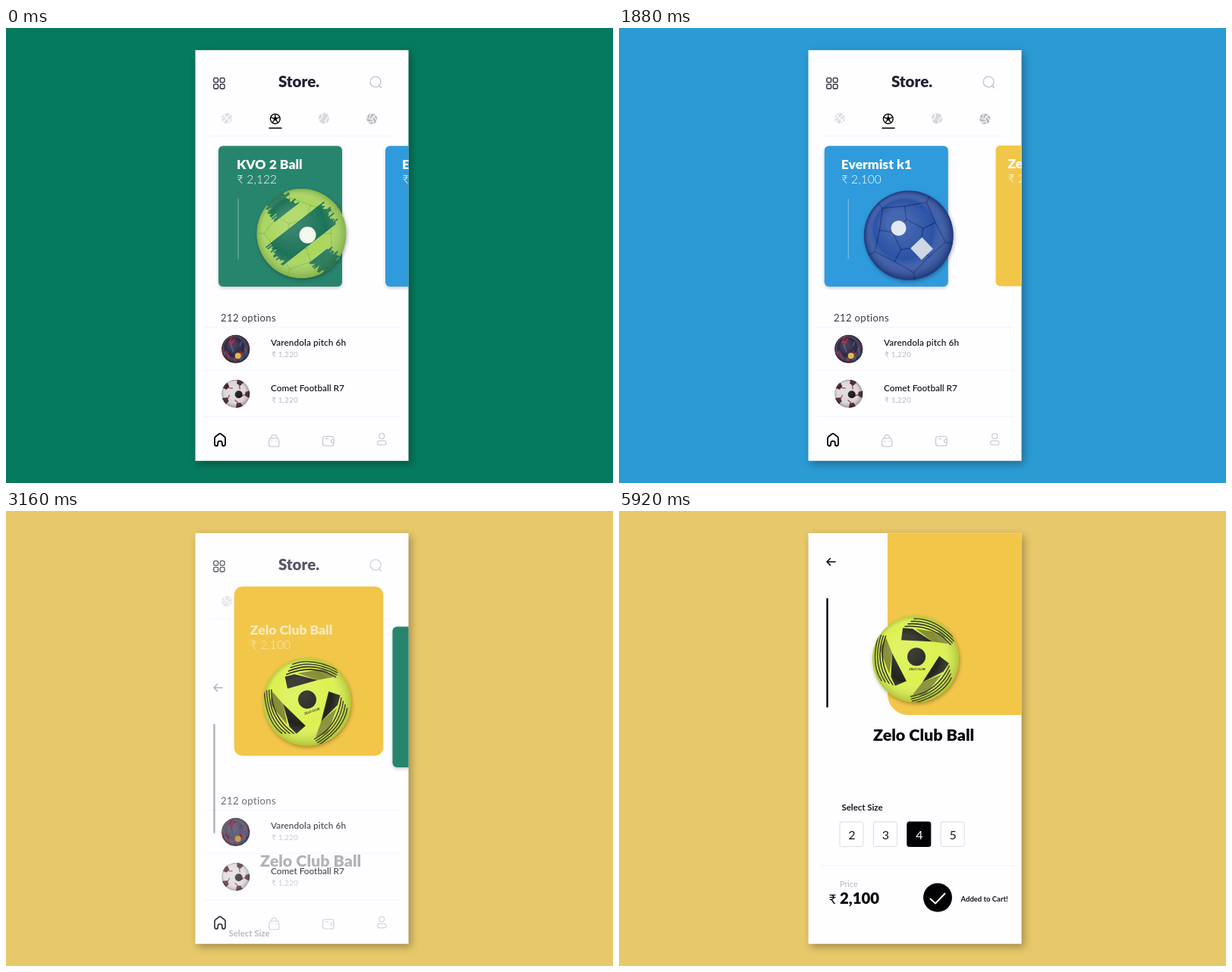
Write an HTML page with a canvas that moves like this. It is 800 px wide and 600 px high and loops after 6320 ms.

```html
<!DOCTYPE html>
<html lang="en">
<head>
<meta charset="utf-8">
<title>Ball store</title>
<style>
html, body { margin: 0; width: 100%; height: 100%; overflow: hidden; }
canvas { display: block; }
</style>
</head>
<body>
<canvas id="stage" width="800" height="600"></canvas>
<script>
const c = document.getElementById('stage').getContext('2d');
const LOOP = 6320, TAU = Math.PI * 2, RAD = Math.PI / 180;
const FONT = 'Lato, "Noto Sans", sans-serif';
const INK = '#231f32', BLACK = '#020204', RULE = '#f4f4f6';
const GREEN = [6, 122, 94], BLUE = [38, 154, 214], YELLOW = [231, 200, 106];

const lerp = (a, b, p) => a + (b - a) * p;
const mix = (a, b, p) => a.map((v, i) => lerp(v, b[i], p));

// cubic-bezier(.42, 0, .58, 1)
function ease(x) {
  if (x <= 0) return 0;
  if (x >= 1) return 1;
  let lo = 0, hi = 1, s = x;
  for (let i = 0; i < 22; i++) {
    s = (lo + hi) / 2;
    const r = 1 - s;
    if (1.26 * r * r * s + 1.74 * r * s * s + s * s * s < x) lo = s; else hi = s;
  }
  return s * s * (3 - 2 * s);
}
const span = (t, from, to) => ease((t - from) / (to - from));

function seeded(n) {
  return () => (n = (n * 16807) % 2147483647) / 2147483647;
}

function text(s, x, y, size, weight, color, gap = 0, align = 'left') {
  c.font = `${weight} ${size}px ${FONT}`;
  c.letterSpacing = gap + 'px';
  c.textAlign = align;
  c.fillStyle = color;
  c.fillText(s, x, y);
}

function line(x1, y1, x2, y2, color, w = 1) {
  c.strokeStyle = color;
  c.lineWidth = w;
  c.beginPath();
  c.moveTo(x1, y1);
  c.lineTo(x2, y2);
  c.stroke();
}

function box(x, y, w, h, r) {
  c.beginPath();
  c.roundRect(x, y, w, h, r);
}

function disc(x, y, r, color) {
  c.fillStyle = color;
  c.beginPath();
  c.arc(x, y, r, 0, TAU);
  c.fill();
}

function poly(points, color) {
  c.fillStyle = color;
  c.beginPath();
  points.forEach(p => c.lineTo(p[0], p[1]));
  c.closePath();
  c.fill();
}

function icon(d, color, w) {
  c.strokeStyle = color;
  c.lineWidth = w;
  c.stroke(new Path2D(d));
}

function withAlpha(a, draw) {
  if (a <= 0) return;
  c.save();
  c.globalAlpha = Math.min(1, a);
  draw();
  c.restore();
}

function shadow(color, blur, x, y) {
  c.shadowColor = color;
  c.shadowBlur = blur;
  c.shadowOffsetX = x;
  c.shadowOffsetY = y;
}

// ---- balls ----

function ball(x, y, r, angle, base, rim, art) {
  c.save();
  c.translate(x, y);
  c.save();
  if (r > 30) shadow('rgba(0,0,0,.32)', 5, 1, 2);
  disc(0, 0, r, base);
  c.restore();
  c.beginPath();
  c.arc(0, 0, r, 0, TAU);
  c.clip();
  c.save();
  c.rotate(angle * RAD);
  art();
  c.restore();
  const g = c.createRadialGradient(-r * .25, -r * .3, r * .25, 0, 0, r);
  g.addColorStop(0, 'rgba(255,255,255,.12)');
  g.addColorStop(.55, 'rgba(255,255,255,0)');
  g.addColorStop(1, rim);
  disc(0, 0, r, g);
  c.restore();
}

// A central pentagon, spokes and outer ring of panels
function seams(color, r, w) {
  const at = (k, d) => [Math.cos(k * TAU / 10) * d, Math.sin(k * TAU / 10) * d];
  for (let k = 0; k < 10; k += 2) {
    const a = at(k, r * .36), b = at(k, r * .66);
    const left = at(k - 1, r * .84), right = at(k + 1, r * .84);
    line(...a, ...at(k + 2, r * .36), color, w);
    line(...a, ...b, color, w);
    line(...b, ...left, color, w);
    line(...b, ...right, color, w);
    line(...right, ...at(k + 1, r), color, w);
  }
}

function brush(x, y, w, h, angle, seed) {
  const rnd = seeded(seed);
  c.save();
  c.translate(x, y);
  c.rotate(angle * RAD);
  c.fillStyle = '#197158';
  for (let i = -h / 2; i < h / 2; i += 1.5) {
    const a = rnd() * 10, b = rnd() * 10;
    c.fillRect(-w / 2 + a, i, w - a - b, 1.9);
  }
  c.restore();
}

function greenBall(x, y, angle) {
  ball(x, y, 59, angle, '#a9d65d', 'rgba(60,110,40,.35)', () => {
    seams('rgba(90,150,50,.4)', 59, 1);
    brush(2, 0, 100, 33, -38, 17);
    brush(-28, -38, 42, 27, 142, 31);
    brush(34, 37, 40, 27, -38, 53);
    disc(8, 2, 11, '#f2f8ee');
  });
}

function blueBall(x, y, angle) {
  ball(x, y, 59, angle, '#2c52a6', 'rgba(10,25,80,.5)', () => {
    seams('rgba(17,38,100,.75)', 59, 1.3);
    disc(-16, 3, 10, '#dfe6f2');
    c.fillStyle = '#ced7e4';
    c.fillRect(14, -11, 21, 21);
  });
}

function limeBall(x, y, r, angle) {
  ball(x, y, r, angle, '#dcf14f', 'rgba(110,130,10,.38)', () => {
    for (let k = 0; k < 3; k++) {
      c.save();
      c.rotate(k * TAU / 3);
      poly([[0, -40], [36, -34], [43, -20], [22, -23]], '#848c34');
      poly([[-17, -41], [-4, -40], [22, -23], [-19, -25]], '#22241c');
      for (let i = 0; i < 4; i++) {
        c.strokeStyle = '#2a2d18';
        c.lineWidth = 1.6;
        c.beginPath();
        c.moveTo(-14 + i * 4, -43 - i * 3.4);
        c.quadraticCurveTo(24, -46 - i * 3, 46 + i * 2, -19 - i * 2.5);
        c.stroke();
      }
      c.restore();
    }
    disc(1, -3, 12, '#20221a');
    text('ZELO CLUB', 2, 15, 4, 900, '#3d4120', 0, 'center');
  });
}

// ---- cards ----

const NAMES = { green: 'KVO 2 Ball', blue: 'Evermist k1', yellow: 'Zelo Club Ball' };
const FILLS = { green: '#28856d', blue: '#2f9bdc', yellow: '#f2c649' };
const PAD = { green: 24, blue: 22, yellow: 16 };

function label(kind, x, y) {
  text(NAMES[kind], x, y, 17.5, 900, '#fff');
  text(kind === 'green' ? '₹ 2,122' : '₹ 2,100', x, y + 19, 15.5, 300, '#fff', .1);
}

function panel(kind, x, y, w, h, r) {
  c.save();
  if (kind !== 'yellow') shadow('rgba(0,0,0,.2)', 4, 0, 2);
  c.fillStyle = FILLS[kind];
  box(x, y, w, h, r);
  c.fill();
  c.restore();
}

function card(kind, x, y, angle) {
  if (x > 531 || x < 60) return;
  panel(kind, x, y, 163, 185.5, 6);
  label(kind, x + PAD[kind], y + 30);
  if (kind !== 'yellow') {
    const lx = x + (kind === 'green' ? 26 : 31.5);
    line(lx, y + 70, lx, y + 149, 'rgba(255,255,255,.4)');
  }
  if (kind === 'green') greenBall(x + 109.5, y + 115.5, angle);
  if (kind === 'blue') blueBall(x + 111, y + 118, angle);
  if (kind === 'yellow') limeBall(x + 116, y + 115.5, 58, angle);
}

// ---- store screen ----

function tabIcon(x, y, color, kind) {
  c.save();
  c.translate(x, y);
  if (kind === 1) {
    c.strokeStyle = color;
    c.lineWidth = 1.4;
    c.beginPath();
    c.arc(0, 0, 6.4, 0, TAU);
    c.stroke();
    const star = [];
    for (let k = 0; k < 5; k++) {
      const a = (k * 72 - 90) * RAD, u = Math.cos(a), v = Math.sin(a);
      star.push([u * 2.7, v * 2.7]);
      line(u * 2, v * 2, u * 6, v * 6, color, 1.3);
    }
    poly(star, color);
  } else {
    disc(0, 0, 7, color);
    c.beginPath();
    c.arc(0, 0, 7.2, 0, TAU);
    c.clip();
    if (kind === 0) {
      icon('M-6-6L6 6M-6 6L6-6M-1-8Q-3 0-8 1M8-1Q1 2 1 8', '#fff', 1.2);
    } else if (kind === 2) {
      icon('M-3-8Q0 0-8 3M8-3Q0 0 3 8', '#fff', 1.3);
    } else {
      for (let k = 0; k < 3; k++) {
        c.rotate(TAU / 3);
        icon('M0 0Q1-5 7-5M-3-1Q-3-6 2-9', '#fff', 1.2);
      }
    }
  }
  c.restore();
}

function mottledBall(x, y) {
  ball(x, y, 18.5, 0, '#2c2540', 'rgba(20,10,20,.6)', () => {
    const rnd = seeded(77);
    for (let i = 0; i < 26; i++) {
      const px = rnd() * 36 - 18, py = rnd() * 36 - 18;
      line(px, py, px + rnd() * 10 - 5, py + 4 + rnd() * 6, i % 3 ? '#96203a' : '#2f4f8c', 2);
    }
    disc(3, 9, 4, '#e3b83c');
  });
}

function whiteBall(x, y) {
  ball(x, y, 18.5, 0, '#dcd7d9', 'rgba(60,30,40,.4)', () => {
    for (let k = 0; k < 5; k++) {
      c.save();
      c.rotate((k * 72 + 20) * RAD);
      poly([[-5, -20], [6, -20], [2, -12], [-3, -13]], '#3a1d28');
      line(0, -13, 3, -8, '#a04555', 1.3);
      c.restore();
    }
    disc(4, 1, 5, '#18161a');
  });
}

function storeScreen() {
  for (const x of [273.8, 282.2]) for (const y of [65.8, 74.2]) {
    c.strokeStyle = INK;
    c.lineWidth = 1.3;
    box(x, y, 5.8, 5.8, 1.6);
    c.stroke();
  }
  text('Store.', 386, 77.5, 20.5, 900, INK, 0, 'center');
  icon('M494 71a7 7 0 1 1-14 0a7 7 0 1 1 14 0M492 76.5L494.5 79', '#b9b9bf', 1.1);

  tabIcon(291, 119, '#dedee0', 0);
  tabIcon(354.8, 119.8, '#000', 1);
  tabIcon(419, 119.3, '#d9d9db', 2);
  tabIcon(482.3, 119.8, '#b9b9bb', 3);
  line(347, 132, 363, 132, '#000', 1.6);
  line(267, 142.5, 507, 142.5, RULE);

  text('212 options', 283, 386.5, 13, 400, '#3c3c42', .4);
  for (const y of [394.5, 451.5, 512.5]) line(261, y, 519, y, RULE);
  mottledBall(302.7, 423.3);
  whiteBall(302.7, 482.3);
  text('Varendola pitch 6h', 349, 418.5, 11.8, 500, '#0b0b0e', .1);
  text('Comet Football R7', 349, 478.5, 11.8, 500, '#0b0b0e');
  for (const y of [433.5, 493.5]) text('₹ 1,220', 350, y, 10, 400, '#bbbbc0', .15);

  icon('M275 541.5Q275 540 276 539L280.5 535.5Q282 534.4 283.5 535.5L288 539Q289 540 289 541.5V548.5Q289 551 286.7 551Q284.8 551 284.8 549V547.5A2.8 2.8 0 0 0 279.2 547.5V549Q279.2 551 277.3 551Q275 551 275 548.5Z', BLACK, 1.8);
  icon('M348 541H358.5Q360.3 545 360 549Q360 552 357 552H349.5Q346.5 552 346.5 549Q346.2 545 348 541ZM349.8 541V540A3.4 3.4 0 0 1 356.7 540V541M350.5 544.5v.8M356 544.5v.8', '#c4c4c8', 1.1);
  icon('M420.5 538.5H429Q432 538.5 432 541.5V548Q432 551 429 551H420.5Q417.5 551 417.5 548V541.5Q417.5 538.5 420.5 538.5ZM432 542.7H430A2.2 2.2 0 0 0 430 547H432M421 541.7H425', '#c4c4c8', 1.1);
  icon('M498.7 538.3a3.5 3.5 0 1 1-7 0a3.5 3.5 0 1 1 7 0M493 544.2H497.5Q501 544.2 501 547Q501 549.8 497.5 549.8H493Q489.5 549.8 489.5 547Q489.5 544.2 493 544.2Z', '#c4c4c8', 1.1);
}

// ---- product screen ----

function cartButton(t) {
  const press = span(t, 4150, 4770), fold = span(t, 4780, 5400);
  const left = lerp(387.3 + 4.7 * press, 401, fold);
  const right = lerp(502.5 - 4.5 * press, 439, fold);
  c.fillStyle = BLACK;
  box(left, 490.7, right - left, 38, 19);
  c.fill();

  withAlpha(1 - press, () => text('Add to Cart', 433, 514, 9.6, 400, '#fff'));
  withAlpha(1 - fold * 1.4, () => {
    c.save();
    c.translate(9 * fold, 0);
    icon('M401.5 502H403.5Q405 502 405.2 503.5L406.3 513Q406.6 515 408.5 515H417.5Q419 515 419.3 513.5L420.5 504.5H405.5M412.5 508.5H416.5', '#fff', 1.2);
    disc(406.5, 518.5, 1.1, '#fff');
    disc(417.5, 518.5, 1.1, '#fff');
    c.restore();
  });

  const tick = span(t, 5420, 5720);
  if (tick > 0) {
    c.save();
    c.setLineDash([29 * tick, 60]);
    icon('M410.5 511.5L417 517.5L429.5 504.5', '#fff', 2);
    c.restore();
  }
  const slide = span(t, 5420, 5920);
  if (slide > 0) text('Added to Cart!', lerp(532, 450.5, slide), 514.5, 9.5, 700, '#111114');
}

function productScreen(t) {
  icon('M285 67H274M278.5 62.5L274 67L278.5 71.5', BLACK, 1.5);
  line(274.5, 116, 274.5, 258, BLACK, 2.4);
  text(NAMES.yellow, 335, 302.5, 21.5, 900, BLACK);
  text('Select Size', 293.5, 395, 11.4, 700, '#17171b');

  [2, 3, 4, 5].forEach((n, i) => {
    const x = 291 + i * 44.4, on = n === 4;
    box(x, 410, 31, 32.5, 2.5);
    c.fillStyle = on ? BLACK : '#fff';
    c.fill();
    c.strokeStyle = on ? BLACK : '#dcdce0';
    c.lineWidth = 1;
    c.stroke();
    text(n, x + 16, 432.5, 16, 400, on ? '#fff' : '#17171b', 0, 'center');
  });

  line(265, 467.5, 520, 467.5, RULE);
  text('Price', 291, 495.5, 10.8, 400, '#b9b9be');
  text('₹', 276.5, 517.5, 17, 400, BLACK);
  text('2,100', 291, 517.5, 20.3, 900, BLACK);
  cartButton(t);
}

// ---- scene ----

function background(t) {
  const toBlue = span(t, 600, 1210), toYellow = span(t, 1806, 2406);
  return mix(mix(GREEN, BLUE, toBlue), YELLOW, toYellow);
}

function draw(t) {
  const first = span(t, 555, 1075);
  const second = span(t, 1795, 2315);
  const open = span(t, 2919, 3620);

  c.globalAlpha = 1;
  c.fillStyle = `rgb(${background(t).map(Math.round).join(',')})`;
  c.fillRect(0, 0, 800, 600);

  c.save();
  shadow('rgba(0,0,0,.3)', 10, 3, 4);
  c.fillStyle = '#fefdff';
  c.fillRect(249.5, 29.2, 281, 541.6);
  c.restore();

  c.save();
  c.beginPath();
  c.rect(249.5, 29.2, 281, 541.6);
  c.clip();
  c.lineCap = c.lineJoin = 'round';

  withAlpha(1 - open, storeScreen);

  card('green', lerp(280, -20, first), 155.5, 70 * first);
  const blueX = second > 0 ? lerp(284, 44, second) : lerp(500, 284, first);
  card('blue', blueX, 155.5, lerp(-47, 43, first) + 60 * second);
  card('green', lerp(731, 497, second) + 50 * open, 152.5, -90 * (1 - second));

  const yellowX = lerp(lerp(740, 509, first), 283, second);
  if (open > 0) {
    panel('yellow', lerp(283, 354, open), lerp(155, -68, open),
      lerp(163, 298, open), lerp(185.5, 337, open), lerp(6, 27, open));
    withAlpha(1 - open * 1.4, () => label('yellow', lerp(299, 391, open), lerp(185, 97, open)));
    limeBall(lerp(399, 391, open), lerp(270.5, 195.3, open), lerp(58, 57, open), lerp(-25, 0, open));
    withAlpha(open * 1.2, () => {
      c.translate(0, 221 * (1 - open));
      productScreen(t);
    });
  } else {
    card('yellow', yellowX, 155, -25 - 90 * (1 - second));
  }
  c.restore();
}

const begin = performance.now();
function tick() {
  draw((performance.now() - begin) % LOOP);
  requestAnimationFrame(tick);
}
tick();
</script>
</body>
</html>
```
